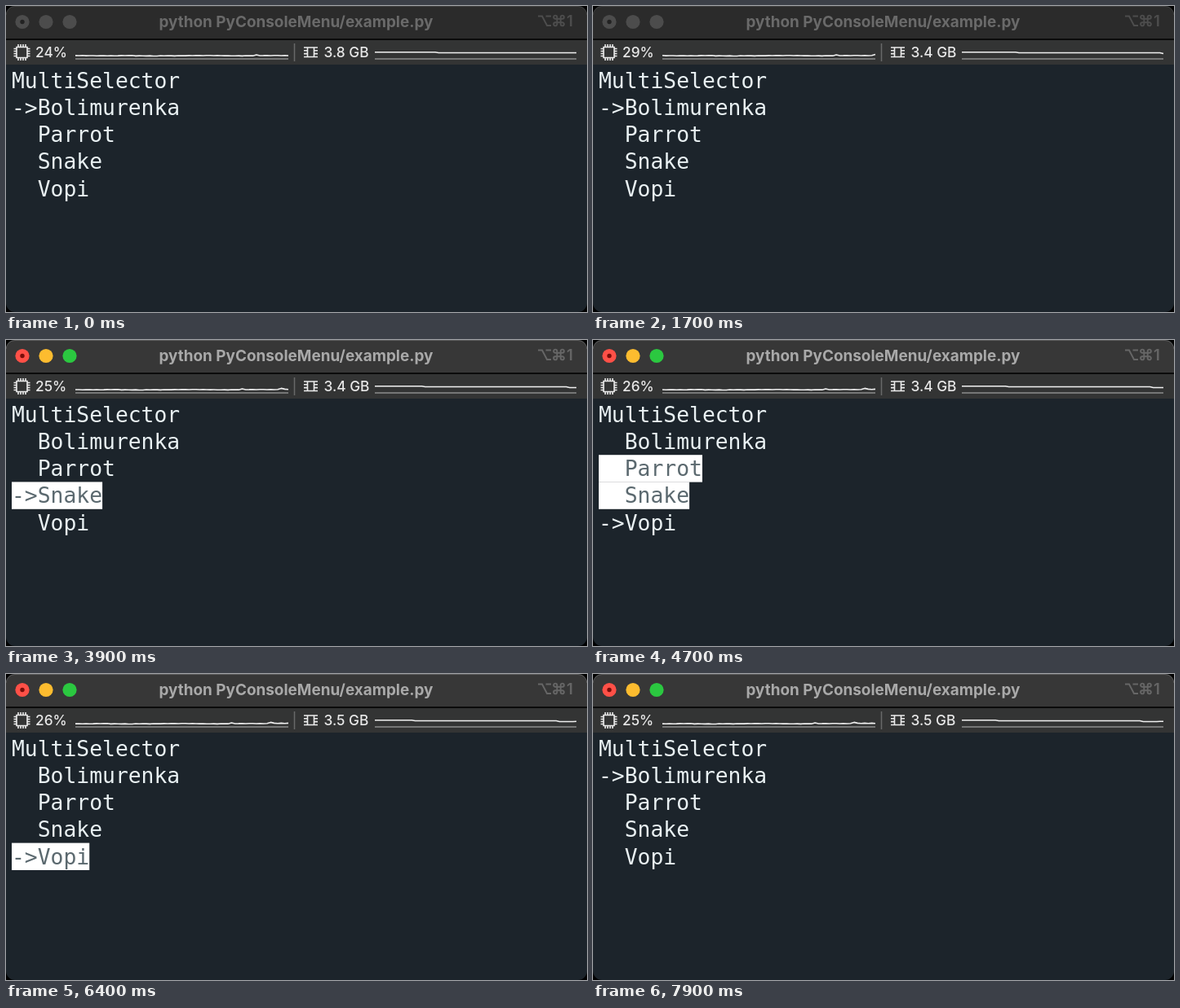
Recreate the animation shown at these times as an HTML page. Size 712x376 px, loop 8000 ms.

```html
<!DOCTYPE html>
<html lang="en">
<head>
<meta charset="utf-8">
<title>Console menu</title>
<style>
  html, body { margin: 0; width: 100%; height: 100%; overflow: hidden; background: #000; }
  svg { display: block; width: 712px; height: 376px; }
  text { white-space: pre; }
  .ui { font-family: Inter, Roboto, sans-serif; }
  .title { font-size: 18.9px; font-weight: 700; text-anchor: middle; }
  .status { font-size: 17.3px; font-weight: 500; fill: #e8e8e8; }
  .term { font: 26.35px "DejaVu Sans Mono", "Noto Sans Mono", monospace; fill: #e9f1f3; }
  .icon { fill: none; stroke: #ececec; stroke-width: 1.6; }
  .graph { fill: none; stroke: #f0f0f0; stroke-width: 1.6; stroke-linejoin: round; }
  .base { stroke: #8b8c8c; stroke-width: 1.3; }
</style>
</head>
<body>
<svg viewBox="0 0 712 376">
  <defs>
    <clipPath id="window"><rect width="712" height="376" rx="11"/></clipPath>
    <path id="loop" d="M5.3 5.3H3.2a2.1 2.1 0 1 1 2.1-2.1z"/>
  </defs>
  <g clip-path="url(#window)">
    <rect width="712" height="376" fill="#1c242b"/>
    <rect id="bar" width="712" height="40"/>
    <rect y="40" width="712" height="2" fill="#0b0b0b"/>
    <rect y="42" width="712" height="30" fill="#333434"/>
    <path id="edge" d="M0 11A11 11 0 0 1 11 .5H701A11 11 0 0 1 712 11" fill="none"/>
    <g id="lights"></g>
    <circle id="dot" cx="20" cy="19.5" r="2.7"/>
    <text id="title" class="ui title" x="355.5" y="26">python PyConsoleMenu/example.py</text>
    <g id="shortcut">
      <g fill="none" stroke="currentColor" stroke-width="1.9">
        <path d="M652 12.5h5l6 11.5h5M661.500 12.500h6.500"/>
        <g transform="translate(670 10.500)">
          <use href="#loop"/>
          <use href="#loop" transform="rotate(90 7.5 7.5)"/>
          <use href="#loop" transform="rotate(180 7.5 7.5)"/>
          <use href="#loop" transform="rotate(270 7.5 7.5)"/>
          <rect x="5.3" y="5.3" width="4.4" height="4.4"/>
        </g>
      </g>
      <text class="ui" x="687" y="25" font-size="18.500" font-weight="600" fill="currentColor">1</text>
    </g>

    <path class="icon" d="M13 50.500h13v13h-13zM15 47v3m3-3v3m3-3v3m3-3v3M15 64v3m3-3v3m3-3v3m3-3v3M9.500 52.500h3m-3 3h3m-3 3h3m-3 3h3M26.500 52.500h3m-3 3h3m-3 3h3m-3 3h3"/>
    <path class="icon" d="M369.500 51h8v11.500h-8zM365 51h4m-4 3.800h4m-4 3.800h4m-4 3.900h4M378 51h4m-4 3.800h4m-4 3.800h4m-4 3.900h4"/>
    <text id="cpu" class="ui status" x="36" y="63"></text>
    <text id="mem" class="ui status" x="389.500" y="63"></text>
    <path d="M353.500 46v22" stroke="#686969" stroke-width="1.500"/>
    <path class="base" d="M85 65H346M452 65H699"/>
    <path id="cpuGraph" class="graph"/>
    <path id="memGraph" class="graph"/>

    <text class="term" x="7" y="101">MultiSelector</text>
    <g id="rows"></g>
  </g>
</svg>
<script>
const LOOP = 8000, FOCUS_AT = 2300, SAMPLES = 60;
const CELL = 15.87, ROW = 33.2, TOP = 108;
const ITEMS = ["Bolimurenka", "Parrot", "Snake", "Vopi"];
const CPU = [24, 25, 29, 26, 25, 26, 25, 26, 25];
const MEM = [3.8, 3.8, 3.4, 3.4, 3.4, 3.4, 3.4, 3.5, 3.5];

// [time, row under the arrow]
const MOVES = [[0, 0], [2800, 1], [3000, 2], [3300, 3], [3600, 2], [4000, 1], [4400, 2],
  [4600, 3], [5100, 2], [5500, 1], [6100, 2], [6300, 3], [7000, 2], [7200, 1], [7500, 0]];
// [time, row whose selection flips]
const TOGGLES = [[3800, 2], [4200, 1], [4900, 3], [5300, 2], [5900, 1], [6700, 3]];

const $ = id => document.getElementById(id);
const make = (parent, tag, attrs) => {
  const el = document.createElementNS("http://www.w3.org/2000/svg", tag);
  for (const key in attrs) el.setAttribute(key, attrs[key]);
  return parent.appendChild(el);
};

const lights = [20, 49, 78].map(cx => make($("lights"), "circle", { cx, cy: 19.5, r: 8.6 }));
const rows = ITEMS.map((name, i) => {
  const y = TOP + i * ROW;
  const box = make($("rows"), "rect", {
    x: 7, y, width: (name.length + 2) * CELL, height: ROW + 0.2, fill: "#fff"
  });
  const label = make($("rows"), "text", { class: "term", x: 7, y: y + 26 });
  return { name, box, label };
});

function cpuY(n) {
  if (n > 0) return 61 - (CPU[n] - 24) * 0.32;
  const ripple = Math.sin(n * 12.9) * 0.2 + Math.sin(n * 2.3) * 0.15;
  const bump = n === -9 ? 0.9 : 0;
  const dip = n > -44 && n < -36 ? 0.4 : 0;
  return 61 + ripple - bump + dip;
}

function memY(n) {
  if (n > 0) return 57.5 + (3.8 - MEM[n]) * 2.5;
  return n < -41 ? 56.8 : 57.5;
}

function plot(el, left, right, last, yAt) {
  const step = (right - left) / SAMPLES;
  const points = Array.from({ length: SAMPLES + 1 }, (_, i) =>
    `${(left + i * step).toFixed(2)} ${yAt(last - SAMPLES + i).toFixed(2)}`);
  el.setAttribute("d", "M" + points.join("L"));
}

function drawChrome(active) {
  const colors = active ? ["#ff5047", "#fdbc2f", "#2bc840"] : ["#4c4c4c", "#4c4c4c", "#4c4c4c"];
  lights.forEach((light, i) => light.setAttribute("fill", colors[i]));
  $("dot").setAttribute("fill", active ? "#790d09" : "#222");
  $("bar").setAttribute("fill", active ? "#373737" : "#2b2b2b");
  $("edge").setAttribute("stroke", active ? "#5c5c5c" : "#414141");
  $("title").setAttribute("fill", active ? "#a9a9a9" : "#6a6a6a");
  $("shortcut").style.color = active ? "#666" : "#4d4d4d";
}

function drawStatus(sample) {
  $("cpu").textContent = CPU[sample] + "%";
  $("mem").textContent = MEM[sample].toFixed(1) + " GB";
  plot($("cpuGraph"), 85, 346, sample, cpuY);
  plot($("memGraph"), 452, 699, sample, memY);
}

function drawMenu(t) {
  const current = MOVES.filter(([at]) => at <= t).pop()[1];
  rows.forEach(({ name, box, label }, i) => {
    const selected = TOGGLES.filter(([at, row]) => at <= t && row === i).length % 2 === 1;
    box.setAttribute("visibility", selected ? "visible" : "hidden");
    label.style.fill = selected ? "#5b696f" : "";
    label.textContent = (i === current ? "->" : "  ") + name;
  });
}

function render(t) {
  drawChrome(t >= FOCUS_AT);
  drawStatus(Math.floor((t + 600) / 1000));
  drawMenu(t);
}

const start = performance.now();
function tick() {
  render((performance.now() - start) % LOOP);
  requestAnimationFrame(tick);
}
tick();
</script>
</body>
</html>
```
